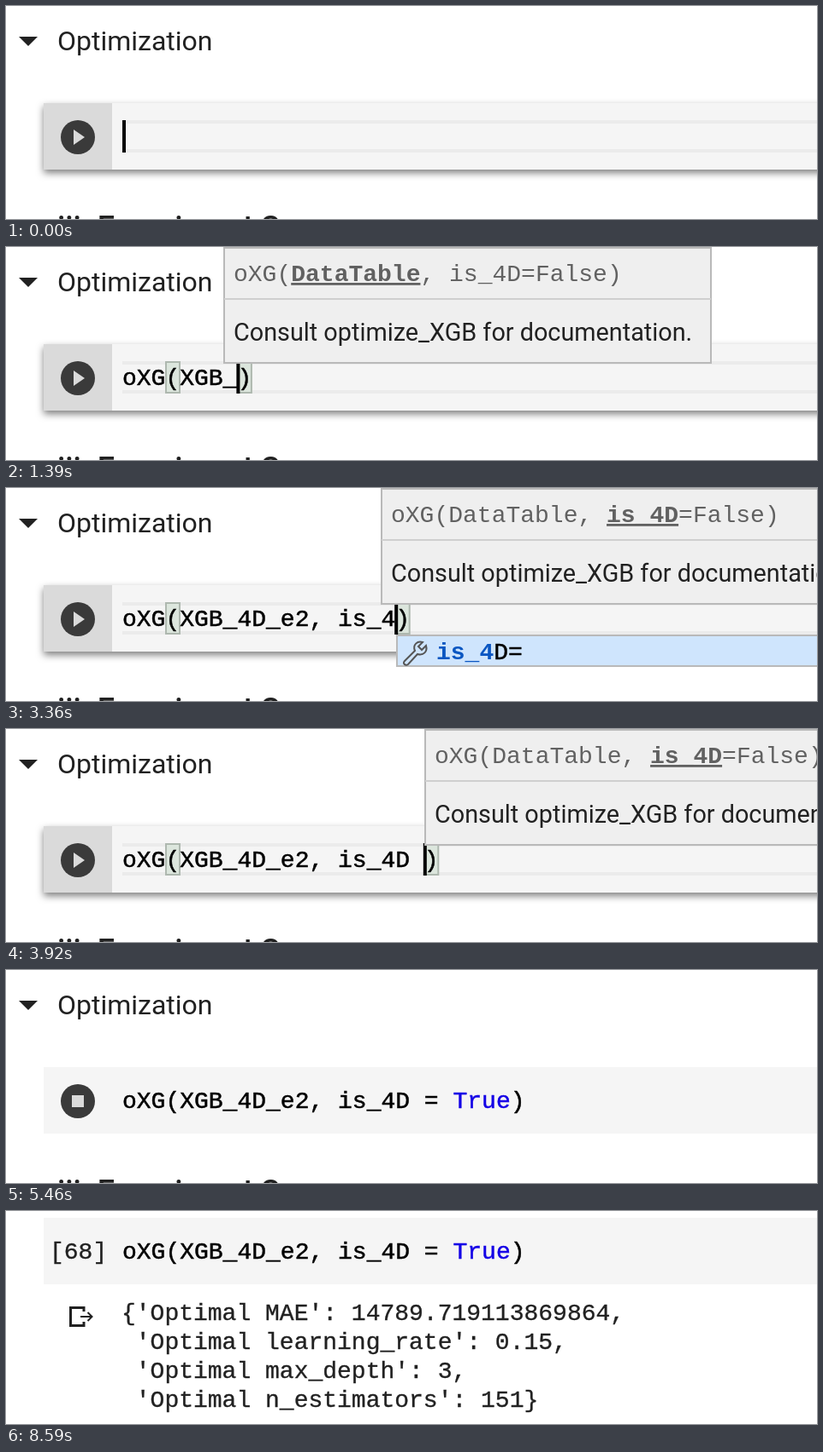
These frames come from a looping animation (948x250 px, 8620 ms). An HTML page:

```html
<!DOCTYPE html>
<html lang="en">
<head>
<meta charset="utf-8">
<title>Notebook cell</title>
<style>
  html, body { margin: 0; width: 100%; height: 100%; overflow: hidden; background: #fff; }
  svg { display: block; }
  text { white-space: pre; fill: #212121; }
  .sans { font-family: Roboto, sans-serif; }
  .mono { font: 28px "Liberation Mono", "Courier New", monospace; }
  .result { stroke: #212121; stroke-width: .35; }
  .code { fill: #000; stroke: #000; stroke-width: .5; }
  .keyword { fill: #1400e6; stroke: #1400e6; }
  .signature { fill: #616161; }
  .active { font-weight: bold; text-decoration: underline; }
  .match { font-weight: bold; fill: #0b57c2; }
  .bracket { fill: #dce6dd; stroke: #aeb8af; stroke-width: 2; }
</style>
</head>
<body>
<svg width="948" height="250" viewBox="0 0 948 250">
  <defs>
    <filter id="shadow" x="-5%" y="-30%" width="110%" height="170%">
      <feDropShadow dx="0" dy="4" stdDeviation="4" flood-color="#000" flood-opacity=".5"/>
    </filter>
  </defs>
  <g id="page">
    <path d="M15 36H37L26 47Z" fill="#212121"/>
    <text class="sans" x="60" y="52" font-size="32">Optimization</text>
    <text id="next" class="sans" x="60" y="272" font-size="36" font-weight="500">iii. Experiment Summary</text>
    <rect id="cell" x="44" y="114" width="930" height="78" fill="#f5f5f5"/>
    <g id="focus">
      <rect x="44" y="114" width="80" height="78" fill="#dadada"/>
      <path d="M136 136H948M136 170H948" stroke="#ebebeb" stroke-width="4"/>
    </g>
    <g id="button">
      <circle cx="84" cy="154" r="20" fill="#3a3a3a"/>
      <path id="play" d="M79 145V163L92 154Z" fill="#dadada"/>
      <rect id="stop" x="77" y="147" width="14" height="14" fill="#dadada"/>
    </g>
    <text id="count" class="mono result" x="51" y="162">[68]</text>
    <rect id="open" class="bracket" x="187" y="135" width="16" height="36"/>
    <rect id="close" class="bracket" y="135" width="16" height="36"/>
    <text class="mono code" x="136" y="162"><tspan id="before"></tspan><tspan id="keyword" class="keyword"></tspan><tspan id="after"></tspan></text>
    <rect id="caret" y="134" width="4" height="38"/>
    <g id="output" fill="none" stroke="#212121">
      <path d="M91 224V219.500H75.500V240.500H91V236" stroke-width="3"/>
      <path d="M87 230H100M95.500 225L100.500 230L95.500 235" stroke-width="2"/>
    </g>
  </g>
  <g id="tooltip">
    <rect x="1" y="1" width="569" height="135" fill="#efefef" stroke="#b9b9b9" stroke-width="2"/>
    <path d="M1 61H570" stroke="#cfcfcf" stroke-width="2"/>
    <text class="mono signature" x="12" y="40">oXG(<tspan id="data">DataTable</tspan>, <tspan id="flag">is_4D</tspan>=False)</text>
    <text class="sans" x="12" y="110" font-size="28.800">Consult optimize_XGB for documentation.</text>
  </g>
  <g id="popup">
    <rect x="1" y="173" width="960" height="36" fill="#cfe5fd" stroke="#b9b9b9" stroke-width="2"/>
    <path d="M10 203L22 191C19 184 25 179 31 181L26 186L30 190L35 185C37 192 32 197 25 195L14 207C11 209 7 206 10 203Z" fill="none" stroke="#555" stroke-width="2"/>
    <text class="mono code" x="47" y="201"><tspan id="match" class="match" stroke="none"></tspan><tspan id="rest"></tspan></text>
  </g>
</svg>
<script>
const LOOP = 8620, LEFT = 136, ADVANCE = 16.8, TOOLTIP_LAG = 60;
const CODE = 'oXG(XGB_4D_e2, is_4D = True';
const KEY_TIMES = [
  120, 340, 520, 670,
  960, 1070, 1180, 1390, 1520, 1660, 1790, 1900, 1990,
  2360, 2500, 2740, 2880, 3010, 3350, 3600, 3860,
  4060, 4160, 4450, 4620, 4740, 4890
];
const RUN = 5200, RESULT = 5600, RESULT_SCROLL = 106;
const POPUPS = [
  { from: 200, to: 670, start: 0, word: 'oXG' },
  { from: 1700, to: 1990, start: 4, word: 'XGB_4D_e2' },
  { from: 3350, to: 3600, start: 15, word: 'is_4D=' }
];
const RESULTS = [
  "{'Optimal MAE': 14789.719113869864,",
  " 'Optimal learning_rate': 0.15,",
  " 'Optimal max_depth': 3,",
  " 'Optimal n_estimators': 151}"
];

const $ = id => document.getElementById(id);
const show = (id, visible) => $(id).setAttribute('display', visible ? 'inline' : 'none');
const move = (id, x, y = 0) => $(id).setAttribute('transform', `translate(${x} ${y})`);
const columnX = column => LEFT + ADVANCE * column;
const typedAt = t => KEY_TIMES.filter(time => time <= t).length;

RESULTS.forEach((line, i) => {
  const text = document.createElementNS('http://www.w3.org/2000/svg', 'text');
  text.setAttribute('class', 'mono result');
  text.setAttribute('x', LEFT - 1);
  text.setAttribute('y', 234 + 34 * i);
  text.textContent = line;
  $('page').append(text);
  $('output').after(text);
  text.id = `result${i}`;
});

function drawCode(t, typed) {
  const complete = typed === CODE.length;
  const editing = t < RUN;
  $('before').textContent = CODE.slice(0, complete ? 23 : typed);
  $('keyword').textContent = complete ? 'True' : '';
  $('after').textContent = typed >= 4 ? ')' : '';
  const x = columnX(typed);
  $('caret').setAttribute('x', typed ? x - 1 : x);
  $('close').setAttribute('x', x + 0.5);
  show('caret', editing);
  show('open', typed >= 4 && editing);
  show('close', typed >= 4 && editing);
}

function drawTooltip(t) {
  const column = typedAt(t - TOOLTIP_LAG);
  show('tooltip', column >= 4 && t < RUN - 100);
  move('tooltip', Math.round(columnX(column)));
  $('data').setAttribute('class', column < 14 ? 'active' : '');
  $('flag').setAttribute('class', column < 14 ? '' : 'active');
}

function drawPopup(t, typed) {
  const popup = POPUPS.find(p => t >= p.from && t < p.to);
  show('popup', popup);
  if (!popup) return;
  const matched = typed - popup.start;
  move('popup', Math.round(columnX(typed)) + 1);
  $('match').textContent = popup.word.slice(0, matched);
  $('rest').textContent = popup.word.slice(matched);
}

function drawPage(t) {
  const running = t >= RUN, done = t >= RESULT;
  move('page', 0, done ? -RESULT_SCROLL : 0);
  $('cell').setAttribute('filter', running ? 'none' : 'url(#shadow)');
  show('focus', !running);
  show('button', !done);
  show('play', !running);
  show('stop', running);
  show('count', done);
  show('output', done);
  RESULTS.forEach((_, i) => show(`result${i}`, done));
  show('next', !done);
}

function render(t) {
  const typed = typedAt(t);
  drawPage(t);
  drawCode(t, typed);
  drawTooltip(t);
  drawPopup(t, typed);
}

const began = performance.now();
function tick() {
  render((performance.now() - began) % LOOP);
  requestAnimationFrame(tick);
}
render(0);
requestAnimationFrame(tick);
</script>
</body>
</html>
```
